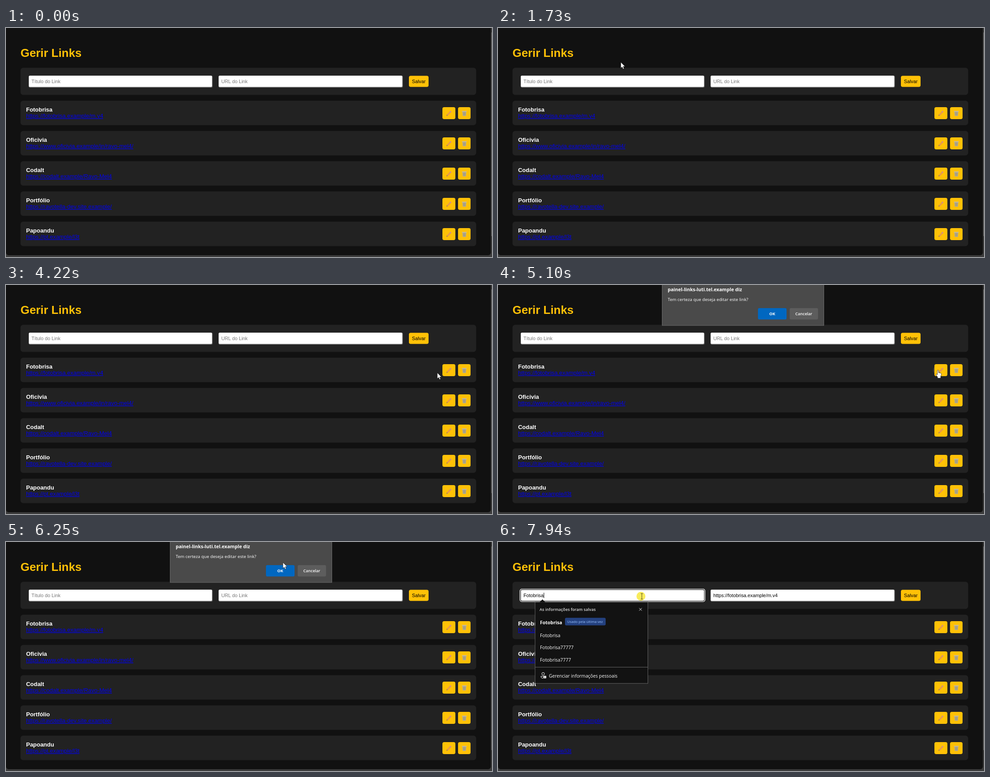
An HTML page that plays this animation: 1088 by 515 pixels, repeating every 8000 ms.

```html
<!DOCTYPE html>
<html lang="pt">
<head>
<meta charset="utf-8">
<title>Gerir Links</title>
<style>
  html, body { margin: 0; width: 100%; height: 100%; overflow: hidden; background: #111; }
  svg { display: block; width: 1088px; height: 515px; font-family: "Liberation Sans", Arial, sans-serif; }
  .ui { font-family: "Open Sans", "Noto Sans", sans-serif; }
  .bold { font-weight: 700; }
  .link { text-decoration: underline; }
</style>
</head>
<body>
<svg id="stage" viewBox="0 0 1088 515" xmlns="http://www.w3.org/2000/svg"></svg>
<script>
const LOOP = 8000;
const DIALOG_OPEN = 5100, DIALOG_CLOSE = 6460, FOCUS = 7940;
const AMBER = '#ffc107';
const NAME = 'Fotobrisa', ADDRESS = 'https://fotobrisa.example/m.v4';
const LINKS = [
  [NAME, ADDRESS],
  ['Oficivia', 'https://www.oficivia.example/in/ravo-mel4/'],
  ['Codalt', 'https://codalt.example/Ravo-Mel4'],
  ['Portfólio', 'https://ravotella-dev.site.example/'],
  ['Papoandu', 'https://pt.example/l3t'],
];

const rect = (x, y, w, h, r, fill, more = '') =>
  `<rect x="${x}" y="${y}" width="${w}" height="${h}" rx="${r}" fill="${fill}" ${more}/>`;
const circle = (x, y, r, fill, more = '') =>
  `<circle cx="${x}" cy="${y}" r="${r}" fill="${fill}" ${more}/>`;
const text = (x, y, size, fill, str, more = '') =>
  `<text x="${x}" y="${y}" font-size="${size}" fill="${fill}" ${more}>${str}</text>`;
const ui = (x, y, size, fill, str, weight = 500, more = '') =>
  text(x, y, size, fill, str, `class="ui" font-weight="${weight}" ${more}`);
const path = (d, fill, stroke = 'none', width = 1) =>
  `<path d="${d}" fill="${fill}" stroke="${stroke}" stroke-width="${width}"/>`;
const group = (id, body) => `<g id="${id}">${body}</g>`;
const at = (x, y, body) => `<g transform="translate(${x} ${y})">${body}</g>`;
const CENTER = 'text-anchor="middle"';

const input = (x, w) =>
  rect(x, 107, w + .5, 27, 3, '#6b6b6b') + rect(x, 107.3, w - .8, 25.2, 2.5, '#fff');

// Icons are drawn around their centre
const pencil =
  path('M-3.5 4L3 -3', 'none', '#e99a4a', 3.4) +
  path('M2.6 -2.6L4.6 -4.8', 'none', '#d08f8a', 3.4) +
  path('M-5.6 6l.8 -3.4 2.4 2.2z', '#9a8450');
const bin =
  path('M-4.5 -4h9l-1 10h-7z', '#b5ac90') +
  path('M-5.3 -4.6H5.3', 'none', '#c4bca4', 1.6) +
  path('M-2 -2.5v7m2 -7v7m2 -7v7', 'none', '#8f8a70', .7);
const iconButton = (x, w, icon) => rect(x, 14.5, w, 27, 4, AMBER) + at(x + w / 2, 28.5, icon);

const card = ([name, url], i) => at(0, 163.5 + i * 68,
  rect(32.5, 0, 1020, 55, 6, '#222') +
  text(45, 24, 12.95, '#fff', name, 'class="bold"') +
  text(45, 38.7, 12.95, '#0000ee', url, 'class="link"') +
  (i ? '' : circle(985, 28, 11, '#3a3a3a', 'id="ring"')) +
  iconButton(977, 29, pencil) + iconButton(1012, 28, bin));

const page =
  rect(0, 0, 1088, 515, 0, '#3b3b3b') +
  path('M0 0H1085.5V505a6 6 0 0 1 -6 6H6a6 6 0 0 1 -6 -6z', '#111') +
  rect(1086.5, 10, 1.5, 458, 0, '#666') +
  text(32.5, 64.5, 25.9, AMBER, 'Gerir Links', 'class="bold"') +
  rect(32.5, 89.5, 1020, 61, 6, '#222') +
  input(51, 411) + input(476, 412) +
  group('focus', rect(49.3, 106, 414, 28, 4, '#fff', 'stroke="#fff" stroke-width="1.5"') +
    rect(50.6, 107.2, 411.4, 25.6, 3, '#fff', 'stroke="#111" stroke-width="1.2"')) +
  group('empty', text(57, 124, 10.8, '#757575', 'Título do Link') +
    text(482, 124, 10.8, '#757575', 'URL do Link')) +
  group('filled', text(57, 124, 10.8, '#000', NAME) + text(482, 124, 10.8, '#000', ADDRESS)) +
  rect(902, 107.5, 44, 25, 4, AMBER) +
  text(924, 124, 10.8, '#000', 'Salvar', CENTER) +
  LINKS.map(card).join('');

const dialog = group('dialog',
  rect(367.5, -5, 362, 96, 0, '#4a4a4a', 'stroke="#6c6c6c"') +
  ui(380, 13.5, 10.6, '#fff', 'painel-links-luti.tel.example diz', 700) +
  ui(380, 36.3, 9.75, '#fff', 'Tem certeza que deseja editar este link?') +
  rect(582, 52, 64, 25.5, 3, '#0067c0') + rect(653, 52, 63.5, 25.5, 3, '#5d5d5d') +
  ui(614, 68, 9.2, '#fff', 'OK', 700, CENTER) +
  ui(684.5, 68, 9, '#fff', 'Cancelar', 600, CENTER));

const personIcon =
  circle(0, -3.5, 3, 'none', 'stroke="#fff"') +
  path('M0 6.5c-3.5 0-5-1.8-5-4.5h5', 'none', '#fff') +
  rect(.5, 1, 6.5, 5.5, 1, '#fff') + path('M2 3.8h3.5', 'none', '#111', .8);

const dropdown = group('dropdown',
  path('M102.8 114v12', 'none', '#000') +
  rect(83, 135, 252.5, 183, 0, '#121212', 'stroke="#666"') +
  path('M93 135.5L99.5 129L106 135.5z', '#121212') +
  ui(93, 155.3, 9.1, '#ddd', 'As informações foram salvas', 600) +
  path('M316 148.5l6 6m0 -6l-6 6', 'none', '#f0f0f0') +
  ui(94, 184.5, 10.5, '#fff', NAME, 700) +
  rect(150, 170.5, 91, 17, 3, '#24417f') +
  ui(155, 182, 7.8, '#9cc4ff', 'Usado pela última vez') +
  ['', '77777', '7777'].map((tail, i) => ui(94, 213.5 + i * 27.5, 10.4, '#fff', NAME + tail)).join('') +
  path('M83 281.5H335', 'none', '#666') +
  at(101, 300, personIcon) + ui(114, 304.7, 10.3, '#fff', 'Gerenciar informações pessoais') +
  circle(320, 122, 10, '#f9ec5c'));

const cursor = group('cursor',
  group('arrow', path('M0 0V13.2L3 10.4L5 15.2L7.2 14.2L5.2 9.6H9.3Z', '#fff', '#111', .6)) +
  group('hand', path('M-1.3 1Q0 -1 1.3 1V6L6.5 7.3Q8 8 7.6 10.5L6 15V18.5H-1V16L-4.6 10.5Q-4.6 8.5 -2.6 9.6L-1.3 11Z',
    '#fff', '#111', .7)) +
  group('beam', path('M-2.5 -6H2.5M0 -6V6.5M-2.5 6.5H2.5', 'none', '#4a4622')));

document.getElementById('stage').innerHTML = page + dialog + dropdown + cursor;
const el = id => document.getElementById(id);
const show = (id, on) => el(id).setAttribute('display', on ? 'inline' : 'none');

// Eased pointer moves; bend pushes the middle of the path sideways
const ENTRY = { x: 1035, y: 512 };
const MOVES = [
  { from: 440, to: 730, x: 637, y: 396 },
  { from: 1063, to: 1580, x: 282, y: 30 },
  { from: 1580, to: 1730, x: 275, y: 77 },
  { from: 1800, to: 1870, x: 277, y: 111 },
  { from: 1870, to: 2690, x: 276, y: 167, bend: 57 },
  { from: 2690, to: 3230, x: 590, y: 208, bend: -63 },
  { from: 3430, to: 4250, x: 967, y: 197, bend: 45 },
  { from: 4300, to: 4900, x: 985, y: 191, bend: -25 },
  { from: 5240, to: 5950, x: 578, y: 105, bend: -145 },
  { from: 5950, to: 6250, x: 620, y: 46 },
  { from: 6310, to: 6790, x: 619, y: 62 },
  { from: 7060, to: 7880, x: 322, y: 122 },
];
const ease = k => k * k * (3 - 2 * k);

function pointerAt(t) {
  let pos = ENTRY;
  for (const move of MOVES) {
    if (t < move.from) break;
    const k = ease(Math.min(1, (t - move.from) / (move.to - move.from)));
    const dx = move.x - pos.x, dy = move.y - pos.y;
    const push = 2 * k * (1 - k) * (move.bend || 0) / Math.hypot(dx, dy);
    pos = { x: pos.x + dx * k - dy * push, y: pos.y + dy * k + dx * push };
  }
  return pos;
}

function pointerKind({ x, y }, modal) {
  const inside = (left, top, right, bottom) => x > left && x < right && y > top && y < bottom;
  if (modal) return 'arrow';
  if (inside(51, 107, 462, 133) || inside(476, 107, 888, 133)) return 'beam';
  return inside(977, 178, 1006, 205) ? 'hand' : 'arrow';
}

function render(t) {
  const saved = t >= DIALOG_CLOSE;
  const asking = t >= DIALOG_OPEN && !saved;
  const clicked = asking && t < DIALOG_OPEN + 200;
  show('empty', !saved);
  show('filled', saved);
  show('dialog', asking);
  show('ring', clicked);
  show('focus', t >= FOCUS);
  show('dropdown', t >= FOCUS);

  const pos = pointerAt(t);
  const kind = pointerKind(pos, asking && !clicked);
  show('cursor', t >= 460);
  for (const id of ['arrow', 'hand', 'beam']) show(id, id === kind);
  el('cursor').setAttribute('transform', `translate(${pos.x.toFixed(1)} ${pos.y.toFixed(1)})`);
}

const start = performance.now();
function tick() {
  render((performance.now() - start) % LOOP);
  requestAnimationFrame(tick);
}
tick();
</script>
</body>
</html>
```
